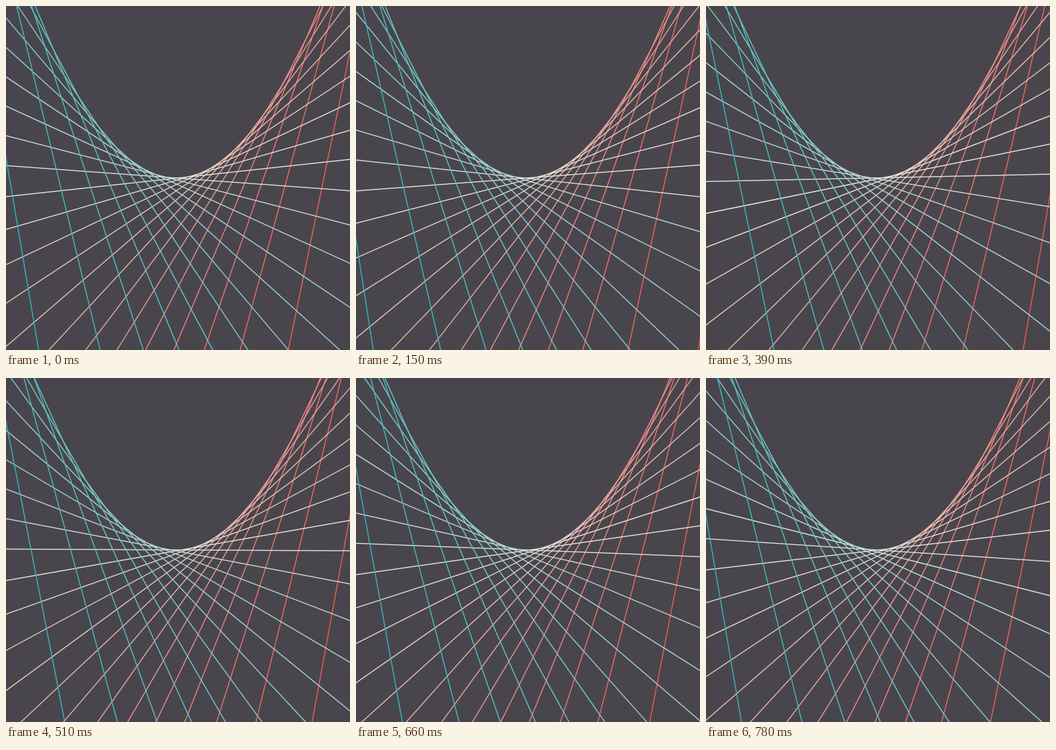
An HTML page with a canvas that plays this animation: 540 px wide and 540 px high, repeating every 810 ms.

```html
<!DOCTYPE html>
<html>
<head>
<meta charset="utf-8">
<style>
  html, body { margin: 0; height: 100%; overflow: hidden; background: #48464c; }
  canvas { display: block; }
</style>
</head>
<body>
<canvas id="stage" width="540" height="540"></canvas>
<script>
const SIZE = 540, MID = SIZE / 2, LOOP = 810, TICK = 30, STEP = 6;
const RED = [245, 55, 54], PALE = [231, 231, 222], TEAL = [14, 172, 186];
const ctx = document.getElementById('stage').getContext('2d');

function colourAt(angle) {
  const end = angle < 0 ? RED : TEAL;
  const k = Math.abs(angle) / 90;
  return `rgb(${PALE.map((v, i) => Math.round(v + (end[i] - v) * k))})`;
}

// Each line is tangent to a slightly tilted parabola with its vertex mid-stage.
function drawTangent(angle) {
  const m = 1.716 * Math.tan(angle * Math.PI / 180) - 0.175;
  const y = 269.8 + (2.5 * m + 46.3 * m * m) / (1 + 0.007 * m);
  const reach = MID + 20;
  ctx.strokeStyle = colourAt(angle);
  ctx.beginPath();
  ctx.moveTo(MID - reach, y - reach * m);
  ctx.lineTo(MID + reach, y + reach * m);
  ctx.stroke();
}

function draw(now) {
  const time = Math.floor(now % LOOP / TICK) * TICK;
  ctx.fillStyle = '#48464c';
  ctx.fillRect(0, 0, SIZE, SIZE);
  ctx.lineWidth = 1.5;
  for (let n = -14; n <= 11; n++) drawTangent(8.22 + STEP * (n + time / LOOP));
  requestAnimationFrame(() => draw(performance.now()));
}
draw(0);
</script>
</body>
</html>
```
